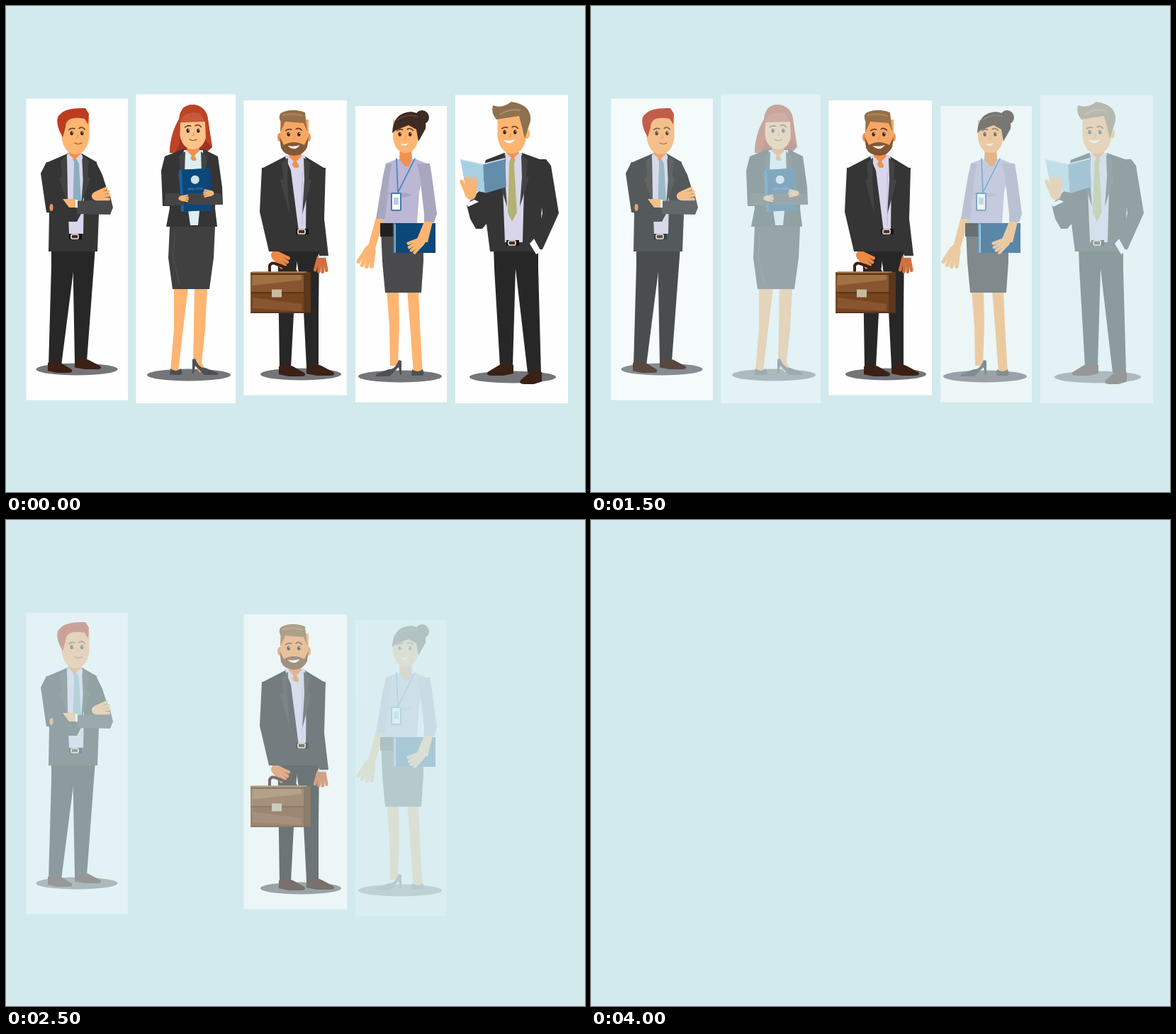
Write an HTML page that moves like this. It is 817 by 685 pixels and loops after 4.5 s.

```html
<!DOCTYPE html>
<html lang="en">
<head>
<meta charset="utf-8">
<title>Fading team</title>
<style>
html, body { margin: 0; width: 100%; height: 100%; overflow: hidden; background: #d2eaee; }
svg { display: block; width: 817px; height: 685px; }
</style>
</head>
<body>
<svg id="stage" viewBox="0 0 817 685"></svg>
<script>
const SUIT = '#353536', LAPEL = '#434344', PANTS = '#272728', SKIN = '#fdb571', SHADE = '#ef924e';
const SHIRT = '#d9d6eb', SHOE = '#3b2016', HEEL = '#4e5054', BLUE = '#0c477a', EYE = '#352a20', WHITE = '#fefefe';
const BLOUSE = '#bbb7d5', SLEEVE = '#a9a6c0', LEATHER = '#875630';

const shape = (fill, d) => `<path fill="${fill}" d="${d}Z"/>`;
const line = (color, width, d) =>
  `<path fill="none" stroke="${color}" stroke-width="${width}" stroke-linecap="round" d="${d}"/>`;
const oval = (fill, x, y, rx, ry = rx) => `<ellipse fill="${fill}" cx="${x}" cy="${y}" rx="${rx}" ry="${ry}"/>`;
const box = (fill, x, y, w, h) => `<rect fill="${fill}" x="${x}" y="${y}" width="${w}" height="${h}"/>`;
const place = (x, y, change, art) => `<g transform="translate(${x} ${y}) ${change}">${art}</g>`;
const mirrored = (x, y, art) => [-1, 1].map(side => place(x, y, `scale(${side} 1)`, art)).join('');

// A silhouette spanned by horizontal sections: [y, left, right].
const strip = (fill, ...rows) => shape(fill, 'M' + [
  ...rows.map(([y, left]) => `${left} ${y}`),
  ...rows.reverse().map(([y, , right]) => `${right} ${y}`),
].join('L'));

const card = (x, y, right, bottom) => box(WHITE, x, y, right - x, bottom - y);
const shadow = (x, y, r) => oval('#747578', x, y, r, 8.5);
const buckle = (x, y) => box('#141414', x - 8, y - 4, 18, 8) +
  `<rect fill="#4a2d1d" stroke="#eee" stroke-width="1.6" x="${x - 5}" y="${y - 3}" width="10" height="6" rx="1.5"/>`;

function face(x, y, w, h, look, skin = SKIN) {
  const half = w / 2, eyeY = y + h * .43;
  const eye = side => {
    const ex = x + look + side * 7.3;
    return oval(EYE, ex, eyeY, 2.2, 3) + oval(WHITE, ex + .8, eyeY - 1.2, .7) +
      line('#754329', 1.8, `M${ex - 4} ${eyeY - 6 - side}q4 -3 8 ${side * 1.5}`);
  };
  return shape(skin, `M${x - half} ${y}v${h * .55}Q${x - half * .8} ${y + h} ${x} ${y + h}` +
    `Q${x + half * .8} ${y + h} ${x + half} ${y + h * .55}V${y}`) + eye(-1) + eye(1) +
    line(SHADE, 1.2, `M${x + look + 1} ${eyeY + 2}v4l-2 1`);
}
const grin = (x, y, w) => shape(WHITE, `M${x - w / 2} ${y}q${w / 2} 2 ${w} -1q${-w * .4} ${w * .6} ${-w} 1`);
const calmMouth = (x, y) => line('#a0532f', 1.2, `M${x - 5} ${y}q5 3 10 0`);
const neck = (x, y) => strip(SHADE, [y - 14, x - 8, x + 8], [y + 4, x - 9, x + 9], [y + 14, x - 1, x + 4]);

const collar = (x, y, color) => mirrored(x, y, shape(color, 'M9 -1L2 6 7 15 12 4'));
const lapels = (x, y, length) => mirrored(x, y, shape(LAPEL, `M11 2L20 9 18 31 22 34 9 ${length} 12 33`));
const tie = (color, x, y) => shape(color, `M${x - 4} ${y}h8l-1 9 4 66 -7 13 -6 -13 2 -66`);
const shoe = (x, y, w, h) => shape(SHOE,
  `M${x} ${y}q${w * .25} -5 ${w * .5} 0l${w * .4} ${h * .65}q${w * .1} ${h * .35} ${-w * .15} ${h * .35}h${-w * .4}L${x} ${y + h * .8}`);
const flatPump = (x, y) => shape(HEEL, `M${x - 8} ${y - 7}q8 6 15 0l2 7 -3 2h-15`);
const sidePump = (x, y, toe) => place(x, y, `scale(${toe} 1)`,
  shape(HEEL, 'M0 -20L4 -21Q9 -7 18 -8L36 -1V2H17L4 -11 2 0H0'));

// Palm with four fanned fingers, pointing right before rotation.
function hand(x, y, angle, size, color = SKIN) {
  const fingers = [-1.5, -.5, .5, 1.5].map(i => line(color, size * .17,
    `M${size * .3} ${i * size * .12}L${size * (.95 - Math.abs(i) * .08)} ${i * size * .2}`));
  return place(x, y, `rotate(${angle})`, oval(color, size * .3, 0, size * .34, size * .26) + fingers.join(''));
}

const crossedArms = () => card(28.5, 130.5, 172, 555.5) + shadow(100, 512, 57.5) +
  strip(PANTS, [340, 64, 98], [366, 64, 96], [507, 60, 78]) +
  strip(PANTS, [340, 94, 126], [501, 97, 114]) + shoe(59, 503, 37, 14) + shoe(97, 499, 40, 13) +
  strip(SUIT, [208, 87, 107], [220, 59, 128], [293, 61, 131], [346, 60, 129]) +
  strip(SUIT, [220, 57, 75], [236, 49, 80], [291, 57, 85]) +
  strip(SUIT, [220, 110, 127], [238, 116, 136], [273, 124, 147]) +
  strip(SHIRT, [209, 86, 107], [270, 87, 110], [321, 89, 109]) + neck(97, 205) +
  tie('#8cafbd', 100, 216) + collar(97, 209, SHIRT) + lapels(97, 209, 72) +
  strip(SUIT, [276, 60, 82], [289, 57, 108], [304, 78, 100]) + oval(SHADE, 64, 284, 2.5, 5) +
  shape('#48494a', 'M100 275L131 273 146 264 151 284 147 294 100 293') +
  strip(SKIN, [272, 80, 98], [284, 89, 101]) + box(WHITE, 98, 273, 3, 11) +
  hand(122, 269, -12, 26) + buckle(97, 325) +
  face(98, 157, 39, 52, 2) + calmMouth(102, 193) +
  shape('#bd3c20', 'M80 185L75 175Q69 158 76 153Q84 143 112 144L117 152 116 167 111 159Q84 154 84 171');

const folderWoman = () => card(183.5, 124.5, 324, 560) + shadow(258, 520, 59) +
  shape('#a3321d', 'M244 160Q246 139 264 139Q283 141 285 160L291 199 280 209 231 207Q231 184 244 160') +
  strip(SKIN, [397, 237, 257], [455, 237, 250], [515, 232, 243]) +
  strip(SKIN, [397, 266, 284], [455, 265, 281], [503, 264, 276], [516, 273, 284]) +
  flatPump(240, 518) + sidePump(263, 518, 1) +
  strip('#404041', [311, 231, 295], [355, 229, 293], [399, 235, 287]) + line('#4b4b4c', 2, 'M238 320L236 355 245 393') +
  strip(SUIT, [202, 249, 279], [212, 224, 299], [285, 231, 295], [311, 226, 298]) +
  strip(SUIT, [212, 224, 240], [232, 219, 238], [282, 221, 240]) +
  strip(SUIT, [212, 286, 299], [255, 288, 305], [280, 284, 306]) +
  strip('#ddedf4', [203, 251, 278], [230, 249, 279], [309, 260, 271]) + neck(264, 204) +
  collar(264, 205, '#ddedf4') + lapels(264, 203, 84) +
  place(244, 231, 'rotate(-3)', box('#1667a0', 0, 0, 42, 59) + box(BLUE, 4, 0, 40, 59) + oval('#cfe1ec', 22, 15, 6) +
    '<text x="22" y="29" text-anchor="middle" font-family="Inter, sans-serif" font-size="4.4" fill="#6c98b8">daily notes</text>') +
  strip('#454547', [264, 226, 247], [281, 222, 252]) + strip('#454547', [264, 256, 303], [280, 256, 306]) +
  hand(244, 271, 0, 14) + hand(293, 264, 180, 15) +
  face(264, 156, 38, 46, 0, '#ffc28a') + calmMouth(264, 188) +
  shape('#bd4325', 'M245 195L238 207 231 206Q232 178 245 158Q246 139 264 139Q282 141 285 160L290 197 282 190 281 163 246 164') +
  shape('#c9593a', 'M246 163Q250 147 274 151L280 163');

const briefcase = () => line('#392214', 4, 'M372 374V366Q375 360 382 364L409 374') +
  box('#5c371c', 419, 375, 11, 58) + box(LEATHER, 345, 375, 75, 58) + box('#754520', 346, 404, 74, 28) +
  shape('#a07145', 'M348 379H417V386L347 394') + shape(LEATHER, 'M348 411L417 420V430L348 426') +
  line('#4e2c17', 1.3, 'M346 378H420M346 404H420M346 432H428') + line('#b08258', 1.5, 'M348 375H424') +
  box('#c8baa0', 375, 399.5, 14, 11);

const briefcaseMan = () => card(335.5, 133, 481, 548.5) + shadow(416, 519, 57) +
  strip(PANTS, [340, 383, 413], [375, 384, 409], [510, 386, 402]) +
  strip(PANTS, [340, 408, 442], [430, 420, 441], [509, 424, 441]) +
  shoe(385, 508, 40, 14) + shoe(424, 507, 42, 14) +
  hand(445, 350, 92, 27, '#d2703e') + box('#dae8f6', 441, 350, 13, 5) + hand(376, 348, 38, 27, '#ed8847') +
  strip(SUIT, [212, 394, 422], [229, 361, 450], [270, 372, 444], [346, 384, 445]) +
  strip(SUIT, [228, 361, 385], [290, 358, 380], [346, 371, 385]) +
  strip(SUIT, [228, 432, 451], [300, 440, 449], [352, 442, 455]) +
  strip(SHIRT, [210, 393, 422], [232, 402, 424], [318, 413, 423]) + neck(408, 214) +
  collar(408, 213, SHIRT) + lapels(409, 212, 82) +
  line('#b7acdc', .8, 'M418 235V310') + buckle(417, 318) + briefcase() +
  oval(SHADE, 386, 185, 3, 6) + oval(SHADE, 427, 185, 3, 6) + face(407, 160, 40, 48, -1, '#f6a766') +
  shape('#835735', 'M386 184L392 196Q406 188 421 196L427 184 425 199Q419 211 407 211 393 211 388 200') + grin(406, 197, 17) +
  shape('#967047', 'M387 178L388 164Q382 152 392 149 405 144 422 150L425 177 420 165 394 163') +
  line('#ad875d', 2, 'M391 154Q407 150 418 155');

const badgeWoman = () => card(493, 141, 622, 558.5) + shadow(556, 522, 59) +
  strip(SKIN, [400, 537, 554], [450, 541, 555], [507, 542, 553]) +
  strip(SKIN, [400, 566, 582], [450, 570, 584], [518, 575, 588]) +
  sidePump(558, 520, -1) + flatPump(581, 519) +
  strip(SKIN, [298, 522, 534], [342, 510, 521]) + hand(516, 338, 110, 33) +
  strip('#4a4a4c', [315, 529, 589], [360, 531, 589], [404, 535, 586]) +
  strip('#202022', [306, 528, 583], [325, 528, 548]) +
  strip(BLOUSE, [216, 551, 579], [222, 536, 594], [262, 534, 583], [306, 531, 580]) +
  strip(SLEEVE, [222, 536, 545], [240, 532, 541], [300, 522, 535]) +
  strip(SLEEVE, [222, 580, 598], [240, 584, 601], [293, 590, 608], [305, 590, 604]) +
  shape(SLEEVE, 'M534 264Q556 260 574 266L562 270') +
  box('#326f9f', 546, 306, 6, 42) + box(BLUE, 550, 306, 56, 42) + line('#e4eef4', 1, 'M549 308V347') +
  strip(SKIN, [304, 590, 602], [333, 578, 595]) + hand(590, 329, 146, 26) +
  neck(564, 212) + line('#3f85bd', 1.6, 'M551 215L553 263 577 215') +
  '<rect x="544" y="264" width="13" height="24" rx="1" fill="#fff" stroke="#477bab" stroke-width="2"/>' +
  box('#b9cde3', 547, 270, 7, 10) +
  oval('#3e2b23', 587, 157, 10) + face(564, 161, 36, 46, -1) + grin(562, 194, 12) +
  shape('#3e2b23', 'M545 179Q546 150 572 149 595 153 592 173L582 191 579 174 568 168 550 175') +
  line('#6a4d38', 1.3, 'M552 161Q566 151 581 156');

const readingMan = () => card(634, 125.5, 793, 560) + shadow(715, 523, 61) +
  strip(PANTS, [340, 688, 723], [370, 689, 719], [508, 697, 715]) +
  strip(PANTS, [340, 714, 751], [370, 719, 751], [517, 736, 755]) +
  shoe(716, 506, -40, 15) + shoe(756, 516, -33, 17) +
  strip(SUIT, [207, 703, 728], [217, 677, 756], [260, 672, 757], [346, 683, 753]) +
  strip(SUIT, [217, 677, 695], [260, 668, 690], [280, 650, 690], [300, 655, 684], [314, 663, 672]) +
  strip(SUIT, [216, 745, 762], [225, 748, 769], [292, 757, 780], [343, 744, 757]) +
  shape(WHITE, 'M739 335L745 328 755 346 748 350') +
  strip(SHIRT, [207, 704, 728], [257, 701, 731], [333, 704, 729]) + neck(715, 204) +
  tie('#b2b271', 714, 216) + collar(715, 208, SHIRT) + lapels(716, 208, 75) + buckle(714, 334) +
  shape('#a9cfe3', 'M641 216L673 223 676 263 649 258') + shape('#638eab', 'M673 223L704 215 706 255 676 264') +
  line('#d8edf5', 1.5, 'M641 216L673 223 704 215') +
  hand(657, 272, -100, 32) + shape(WHITE, 'M649 278L661 273 667 276 652 283') +
  oval(SKIN, 735, 180, 4, 7) + face(714, 155, 41, 53, -3) + grin(710, 189, 17) +
  shape('#8f704f', 'M692 160Q684 151 687 140 700 145 713 135 742 139 740 162L732 187 728 170 724 155 704 158') +
  line('#ad8e68', 2, 'M697 153Q711 144 725 147');

// Each person starts fading at the given half-second step.
const people = [
  { draw: crossedArms, start: 3 },
  { draw: folderWoman, start: 1 },
  { draw: briefcaseMan, start: 4 },
  { draw: badgeWoman, start: 2 },
  { draw: readingMan, start: 1 },
];
const STEP = 500, LOOP = 4500, FADE_STEPS = 5;
const stage = document.getElementById('stage');
stage.innerHTML = people.map(({ draw }) => `<g>${draw()}</g>`).join('');

function render(now) {
  const step = Math.floor(now % LOOP / STEP);
  people.forEach(({ start }, i) => {
    const faded = Math.min(FADE_STEPS, Math.max(0, step - start + 1));
    stage.children[i].setAttribute('opacity', 1 - faded / FADE_STEPS);
  });
}

const began = performance.now();
function tick() {
  render(performance.now() - began);
  requestAnimationFrame(tick);
}
tick();
</script>
</body>
</html>
```
